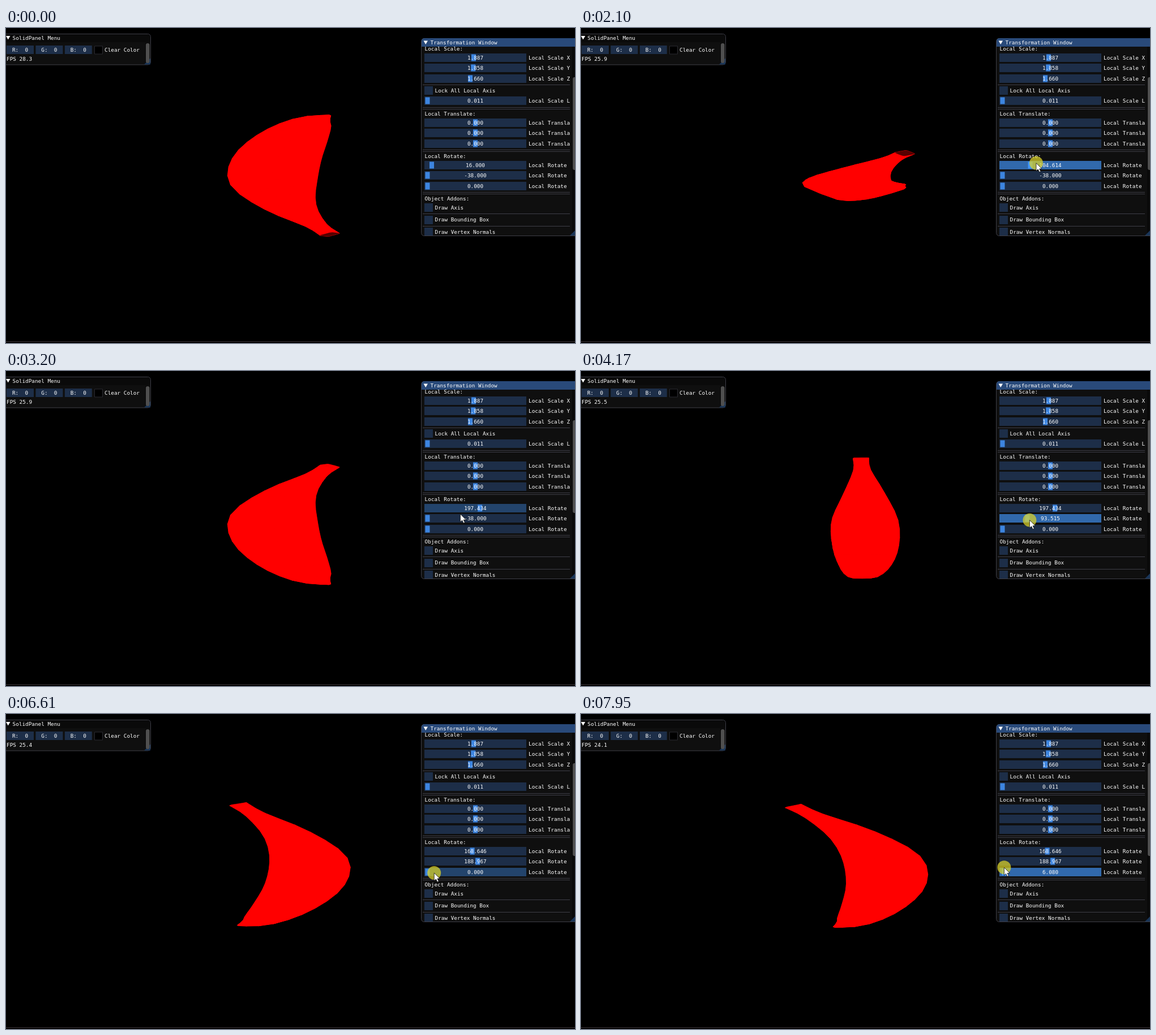
An HTML page with a canvas for the animation above (8000 ms loop, 1005 by 557 pixels).

```html
<!DOCTYPE html>
<html lang="en">
<head>
<meta charset="utf-8">
<title>Mesh rotation</title>
<style>
html, body { margin: 0; width: 100%; height: 100%; overflow: hidden; background: #000; }
canvas { display: block; }
</style>
</head>
<body>
<canvas id="stage" width="1005" height="557"></canvas>
<script>
const ctx = document.getElementById('stage').getContext('2d');
const LOOP = 8000;
const LAG = 70; // widgets react one application frame after the pointer
const PITCH = 18.4;
const COLOR = {
  panel: '#0f0f0f', frame: '#1d2e48', hover: '#23446c', active: '#3169ac',
  grab: '#3d85e0', grabActive: '#4296fa', title: '#294a7a', line: '#3e3e47',
  scroll: '#4f4f4f', grip: '#193558'
};

// ---- Motion: [time, value], linear in between; a repeated time is a jump.
const ROTATION = [
  [[0, 16], [1700, 16], [2100, 104.297], [2440, 212], [2800, 197.434], [5600, 197.434], [6000, 168.646]],
  [[0, -38], [3620, -38], [3620, 26], [4950, 188.967]],
  [[0, 0], [6670, 0], [6670, 24], [7050, 58], [7340, 43.335], [7940, 6.08]]
];
const FPS = [[0, 28.3], [2100, 25.9], [3200, 25.9], [5040, 25.2], [6610, 25.4], [7340, 24.6], [7940, 24.1]];
const DRAGS = [
  { row: 0, from: 1560, to: 2900, y: [236, 243] },
  { row: 1, from: 3560, to: 5110, y: [266, 260] },
  { row: 0, from: 5560, to: 6030, y: [243, 243] },
  { row: 2, from: 6600, to: LOOP, y: [281, 271] }
];

const mix = (a, b, f) => a + (b - a) * f;
const ease = f => f * f * (3 - 2 * f);

function at(keys, t) {
  const i = keys.findIndex(k => k[0] > t);
  if (i < 0) return keys[keys.length - 1][1];
  const [t0, v0] = keys[i - 1], [t1, v1] = keys[i];
  return mix(v0, v1, (t - t0) / (t1 - t0));
}

const anglesAt = t => ROTATION.map(keys => at(keys, t));
const grabX = angle => 744.5 + .469 * Math.max(0, angle);
const dragAt = t => DRAGS.find(d => t >= d.from && t < d.to);

function dragPoint(d, t) {
  return [grabX(at(ROTATION[d.row], t + LAG)), mix(...d.y, (t - d.from) / (d.to - d.from))];
}

// The pointer follows the grab while dragging and glides between drags.
function pointerAt(t) {
  const drag = dragAt(t);
  if (drag) return dragPoint(drag, t);
  const next = DRAGS.findIndex(d => d.from > t);
  const prev = DRAGS[next - 1];
  const start = prev ? prev.to : 70;
  const a = prev ? dragPoint(prev, start) : [935, 560];
  const b = dragPoint(DRAGS[next], DRAGS[next].from);
  const f = ease(Math.max(0, (t - start) / (DRAGS[next].from - start)));
  return [mix(a[0], b[0], f), mix(a[1], b[1], f)];
}

// ---- Mesh: a tapered tube with rounded-square section along a smooth spine.
const CENTER_X = 500, CENTER_Y = 266, STRETCH = 3.15, SIDES = 16, STEPS = 3;
const SPINE = [ // x, y, radius
  [29, -108, 5], [19, -89, 5.5], [.6, -52, 13], [-11, -8, 20.7],
  [-9, 35, 21.3], [2, 73, 17.5], [16, 100, 10.5], [29, 111, .6]
];

function spineAt(u) {
  const last = SPINE.length - 1, i = Math.min(Math.floor(u), last - 1), f = u - i;
  const [a, b, c, d] = [-1, 0, 1, 2].map(k => SPINE[Math.min(last, Math.max(0, i + k))]);
  return b.map((v, j) => v + f / 2 * (c[j] - a[j]
    + f * (2 * a[j] - 5 * v + 4 * c[j] - d[j] + f * (3 * (v - c[j]) + d[j] - a[j]))));
}

const squarish = v => Math.sign(v) * Math.abs(v) ** .35;

const RINGS = Array.from({ length: (SPINE.length - 1) * STEPS + 1 }, (_, i) => {
  const u = i / STEPS;
  const [x, y, r] = spineAt(u);
  const a = spineAt(Math.max(0, u - .1)), b = spineAt(Math.min(SPINE.length - 1, u + .1));
  const tx = b[0] - a[0], ty = b[1] - a[1], len = Math.hypot(tx, ty);
  return Array.from({ length: SIDES }, (_, k) => {
    const angle = k / SIDES * 2 * Math.PI;
    const side = r * squarish(Math.cos(angle)), depth = .87 * r * squarish(Math.sin(angle));
    return [x - side * ty / len, y + side * tx / len, depth];
  });
});

function rotator(degrees) {
  const [sx, cx, sy, cy, sz, cz] = degrees
    .map(d => d * Math.PI / 180)
    .flatMap(a => [Math.sin(a), Math.cos(a)]);
  return ([x, y, z]) => {
    const x1 = x * cz - y * sz, y1 = x * sz + y * cz;
    const z1 = z * cy - x1 * sy;
    return [x1 * cy + z * sy, y1 * cx + z1 * sx, z1 * cx - y1 * sx];
  };
}

function polygon(points) {
  ctx.beginPath();
  points.forEach(p => ctx.lineTo(p[0], p[1]));
  ctx.closePath();
  ctx.fill();
}

function drawMesh(angles) {
  const rotate = rotator(angles);
  const rings = RINGS.map(ring => ring.map(p => {
    const [x, y] = rotate(p);
    return [CENTER_X + x * STRETCH, CENTER_Y - y];
  }));
  ctx.fillStyle = ctx.strokeStyle = '#f00';
  ctx.lineWidth = .6;
  ctx.lineJoin = 'round';
  for (let i = 1; i < rings.length; i++) {
    for (let k = 0; k < SIDES; k++) {
      const n = (k + 1) % SIDES;
      polygon([rings[i - 1][k], rings[i - 1][n], rings[i][n], rings[i][k]]);
      ctx.stroke();
    }
  }
  const [end, inner] = SPINE;
  if (rotate([end[0] - inner[0], end[1] - inner[1], 0])[2] > 4) {
    ctx.fillStyle = '#560000';
    polygon(rings[0]);
  }
}

// ---- Interface helpers
function box(x, y, w, h, color) {
  ctx.fillStyle = color;
  ctx.fillRect(x, y, w, h);
}

function text(str, x, midY, align = 'left') {
  ctx.fillStyle = '#fff';
  ctx.textAlign = align;
  ctx.fillText(str, x, Math.round(midY + 3.2));
}

function roundBox(x, y, w, h, radii, fill, stroke) {
  ctx.beginPath();
  ctx.roundRect(x, y, w, h, radii);
  if (fill) { ctx.fillStyle = fill; ctx.fill(); }
  if (stroke) { ctx.strokeStyle = stroke; ctx.lineWidth = 1; ctx.stroke(); }
}

function arrowDown(x, y) {
  ctx.fillStyle = '#fff';
  polygon([[x, y], [x + 7.5, y], [x + 3.7, y + 6.5]]);
}

function grip(x, y) {
  ctx.fillStyle = COLOR.grip;
  polygon([[x, y - 11], [x, y], [x - 11, y]]);
}

function separators(...ys) {
  ys.forEach(y => box(736, y, 260, 1, COLOR.line));
}

function slider(midY, grab, value, label, state = 'frame') {
  const top = Math.round(midY - 7.6);
  box(739, top, 180, 15, COLOR[state]);
  box(grab - 4, top + 1.5, 8, 12, state === 'active' ? COLOR.grabActive : COLOR.grab);
  text(value.toFixed(3), 829, midY, 'center');
  text(label, 923, midY);
}

function sliderGroup(title, y, values, grabOf, label, states = []) {
  text(title, 739.5, y);
  values.forEach((v, i) =>
    slider(y + 15.6 + PITCH * i, grabOf(v), v, label + ' ' + 'XYZ'[i], states[i]));
}

function checkbox(midY, label) {
  box(739, Math.round(midY - 7.6), 15, 15, COLOR.frame);
  text(label, 757.5, midY);
}

function drawMenu(fps) {
  roundBox(-10, 10.5, 265.5, 54.5, 5, COLOR.panel, COLOR.line);
  roundBox(-9, 11, 264, 14, [5, 5, 0, 0], '#0a0a0a');
  arrowDown(0, 14);
  text('SolidPanel Menu', 11.5, 18);
  [...'RGB'].forEach((name, i) => {
    const x = 1 + 51.4 * i;
    box(x, 31, 48, 15, COLOR.frame);
    text(name + ':  0', x + 24, 39, 'center');
  });
  roundBox(156.5, 32, 14, 14, 0, '#000', '#2a2a30');
  text('Clear Color', 174, 39);
  text('FPS ' + fps.toFixed(1), 1, 55);
  box(246, 26, 9, 38, '#090909');
  grip(255, 64.5);
  roundBox(247, 27, 6.5, 35, 3, COLOR.scroll);
}

function drawTransform(angles, states) {
  roundBox(733.5, 18.5, 290, 349, 5, COLOR.panel, COLOR.line);
  roundBox(734, 18, 290, 15, [5, 5, 0, 0], COLOR.title);
  arrowDown(737.5, 22.5);
  text('Transformation Window', 749.5, 25.5);

  ctx.save();
  ctx.beginPath();
  ctx.rect(734, 33, 262, 334);
  ctx.clip();
  sliderGroup('Local Scale:', 37, [1.887, 1.858, 1.66], v => 776.9 + 26 * v, 'Local Scale');
  separators(100);
  checkbox(111, 'Lock All Local Axis');
  slider(129, 744.5, .011, 'Local Scale L');
  separators(140, 143);
  sliderGroup('Local Translate:', 152, [0, 0, 0], () => 829, 'Local Translate');
  separators(215, 218);
  sliderGroup('Local Rotate:', 227, angles, grabX, 'Local Rotate', states);
  separators(290, 293);
  text('Object Addons:', 739.5, 302);
  ['Draw Axis', 'Draw Bounding Box', 'Draw Vertex Normals'].forEach((label, i) => {
    checkbox(317.5 + 21.6 * i, label);
    separators(328 + 22 * i);
  });
  ctx.restore();

  box(1000, 33, 5, 334, '#090909');
  grip(1007, 367);
  roundBox(1001, 87, 8, 164, 3, COLOR.scroll);
}

function drawPointer([x, y], pressed) {
  if (pressed) {
    ctx.fillStyle = 'rgba(220,212,40,.72)';
    ctx.beginPath();
    ctx.arc(x, y, 12, 0, 2 * Math.PI);
    ctx.fill();
  }
  ctx.fillStyle = '#fff';
  ctx.strokeStyle = '#111';
  ctx.lineWidth = .8;
  polygon([[0, 0], [0, 14], [3.2, 11], [5.6, 16], [8, 15], [5.7, 10.2], [10, 10]]
    .map(p => [x + p[0], y + p[1]]));
  ctx.stroke();
}

function rowStates(t) {
  const held = dragAt(t - LAG + 10);
  const [x, y] = pointerAt(t - LAG);
  return [0, 1, 2].map(row => {
    if (held) return held.row === row ? 'active' : 'frame';
    const over = x >= 739 && x <= 919 && Math.abs(y - 242.6 - PITCH * row) <= 7.5;
    return over ? 'hover' : 'frame';
  });
}

function render(t) {
  const angles = anglesAt(t);
  box(0, 0, 1005, 557, '#000');
  ctx.font = '9.35px "DejaVu Sans Mono", monospace';
  drawMesh(angles);
  box(0, 554, 1005, 1, '#3a3236');
  drawMenu(at(FPS, t));
  drawTransform(angles, rowStates(t));
  if (t >= 70) drawPointer(pointerAt(t), dragAt(t));
}

const start = performance.now();
function tick() {
  render((performance.now() - start) % LOOP);
  requestAnimationFrame(tick);
}
tick();
</script>
</body>
</html>
```
